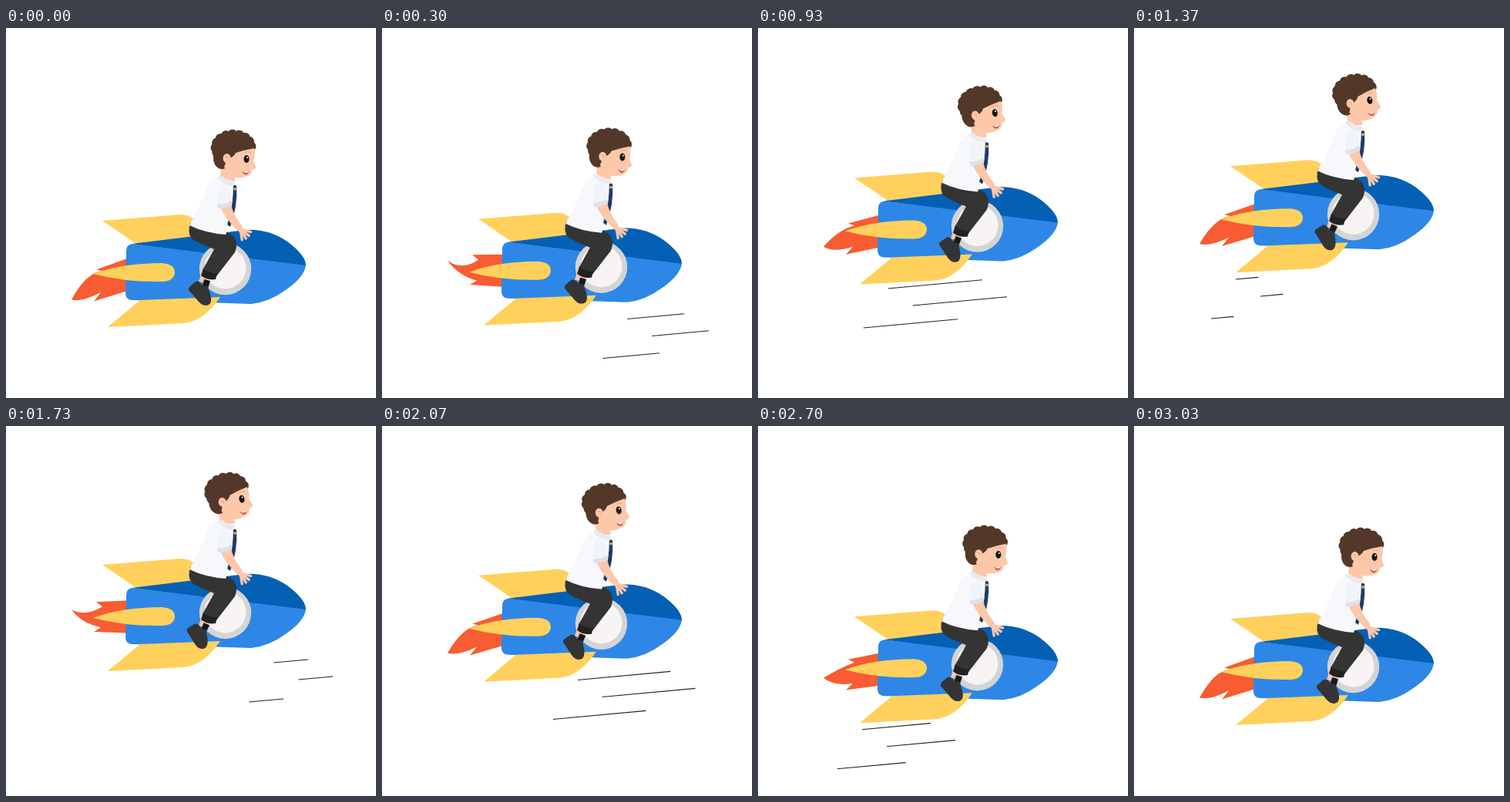
Recreate the animation shown at these times as an HTML page. Size 480 px wide and 480 px high, loop 3.06 s.

```html
<!DOCTYPE html>
<html lang="en">
<head>
<meta charset="utf-8">
<title>Rocket rider</title>
<style>
  html, body { margin: 0; width: 100%; height: 100%; overflow: hidden; background: #fff; }
  svg { display: block; width: 100%; height: 100%; }
  .yellow { fill: #ffd15c; }
  .skin { fill: #fdc7aa; }
  .cloth { fill: #343435; }
</style>
</head>
<body>
<svg viewBox="0 0 480 480">
  <g id="scene">
    <g id="streaks" stroke="#222" stroke-width="1.1"></g>

    <!-- Rocket -->
    <path id="flame" fill="#f85c32"/>
    <path class="yellow" d="M125 250 L226 242 Q246 241 262 270 L172 282Z"/>
    <path fill="#2e87e6" d="M156 289 Q156 281 164 280 L389 307 Q388 322 364 339 Q341 356 318 358 L164 353 Q156 353 155 345Z"/>
    <path fill="#0360b5" d="M163 280 L310 262 Q340 260 365 277 Q389 295 389 308Z"/>
    <path class="yellow" d="M132 388 L174 353 L278 349 Q256 381 230 383Z"/>
    <path class="yellow" d="M113 319 Q150 305 202 305 Q219 306 219 317 Q218 329 202 329 Q155 330 113 319Z"/>
    <circle cx="284.5" cy="312.5" r="33.7" fill="#d4d4d5"/>
    <circle cx="284.5" cy="311.5" r="27" fill="#f9f4f4"/>

    <!-- Leg -->
    <path class="skin" d="M253 319 L266 322 L259 331 L250 329Z"/>
    <g id="shoe">
      <path fill="#171717" d="M257 326 L265 328 L262 338 L255 335Z"/>
      <path class="cloth" d="M246 329 Q251 328 253 332 Q257 336 261 334 L265 345 Q268 356 263 359 Q256 362 250 355 L237 340 Q236 337 240 334Z"/>
    </g>
    <path class="cloth" d="M239 253 Q235 266 241 273 Q247 278 270 287 L255 314 L273 322 L297 291 Q303 275 291 267 Q286 264 280 264Z"/>
    <path fill="#222223" d="M256 312 Q264 319 274 318 L272 326 Q261 328 253 321Z"/>

    <!-- Torso and arm -->
    <path fill="#f6f8fc" d="M275 193 Q265 197 261 207 L250 233 L238 256 Q258 266 285 268 L291 252 L297 225 L297 202Z"/>
    <path fill="#213a68" d="M295 202 L299 205 Q301 230 291 258 L287 255 Q295 230 295 202Z"/>
    <circle cx="297" cy="209" r="1.8" fill="#edbd4a"/>
    <g id="fingers" stroke="#fdc7aa" stroke-width="3.4" stroke-linecap="round"></g>
    <path class="skin" d="M277 230 L292 228 Q294 242 307 258 L303 265 Q284 248 277 230Z"/>
    <path fill="#f1f4f8" d="M275 207 Q283 199 291 208 Q295 218 293 230 L275 234Z"/>
    <path fill="#dde2e8" d="M274 229 Q284 229 292 224 L293 229 Q285 235 275 234Z"/>

    <g id="head">
      <path class="skin" d="M279 180 L296 184 L297 199 Q286 199 278 193Z"/>
      <g id="hair" fill="#533829">
        <ellipse cx="295" cy="155" rx="23" ry="17"/>
        <ellipse cx="280" cy="169" rx="11" ry="14"/>
      </g>
      <path class="skin" d="M283 180 L287 170 Q295 168 298 162 Q310 158 322 156 Q324 164 321 172 L324 180 Q325 183 319 184 Q319 191 311 193 Q291 199 283 180Z"/>
      <ellipse class="skin" cx="286.5" cy="169" rx="5" ry="6"/>
      <path fill="none" stroke="#eba58a" d="M284 167 Q288 166 288 171 M309 162 Q313 159 318 162"/>
      <ellipse cx="312" cy="170" rx="3.5" ry="5" fill="#161616"/>
      <circle cx="313" cy="168" r="1" fill="#fff"/>
      <path fill="#d75d50" d="M306 186 Q311 187 315 184 Q315 192 309 190Z"/>
      <path fill="#fff" d="M307 186 Q311 187 315 184 L314 187 Q311 189 307 186Z"/>
    </g>
    <path fill="#e7ebf0" d="M274 194 Q276 190 280 192 Q287 198 296 198 L297 204 Q284 206 274 194Z"/>
  </g>
</svg>
<script>
  const LOOP = 3060, PEAK = 1500, LANDED = 3030, FLICKER = 700 / 3;
  const get = id => document.getElementById(id);
  const clamp = x => Math.max(0, Math.min(1, x));
  const set = (el, attrs) => { for (const k in attrs) el.setAttribute(k, attrs[k]); };
  const inOutCubic = x => x < .5 ? 4 * x ** 3 : 1 - 4 * (1 - x) ** 3;
  const polar = (cx, cy, rx, ry, deg) => {
    const a = deg * Math.PI / 180;
    return [cx + rx * Math.cos(a), cy + ry * Math.sin(a)];
  };

  // Curls from the fringe over the crown to the nape
  for (let deg = -5; deg > -210; deg -= 22) {
    const [x, y] = polar(295, 155, 23, 17, deg);
    get('hair').innerHTML += `<circle cx="${x}" cy="${y}" r="6.5"/>`;
  }
  for (let deg = 15; deg < 90; deg += 22) {
    const [x, y] = polar(304, 261, 14, 14, deg);
    get('fingers').innerHTML += `<line x1="304" y1="261" x2="${x}" y2="${y}"/>`;
  }
  get('streaks').innerHTML = '<line/>'.repeat(3);

  // A symmetric flame whose parts sag more the farther they are from the nozzle
  function drawFlame(t) {
    const ends = clamp(Math.min(t, LANDED - t) / 100);
    const blow = ends * (1 - Math.cos((t + 43) / FLICKER * 2 * Math.PI)) / 1.76;
    const at = (far, side, sag = 1 - blow) =>
      `${156 - far} ${317.5 + side + sag * (3 + 40 * (far / 71) ** 2)}`;
    get('flame').setAttribute('d', `M${at(0, -21)} L${at(39, -19)} L${at(31, -13)}
      Q${at(52, 0, 0)} ${at(71, -8)} Q${at(58, 9)} ${at(33, 14)} L${at(42, 20)} L${at(0, 21)}Z`);
  }

  // Each streak grows leftwards from its right end, then its right end catches up
  function drawStreaks(t) {
    const x = f => 392 - 260 * f;
    const y = x => 386.5 - .092 * (x - 245);
    const head = x(1 - clamp((1219 - t) / 1165) ** 1.4);
    const tail = x(clamp((t - 384) / 1075) ** 1.4);
    const visibility = tail - head > .3 ? 'visible' : 'hidden';
    [[0, 0], [32, 22], [-32, 51]].forEach(([dx, dy], i) => set(get('streaks').children[i],
      { x1: head + dx, y1: y(head) + dy, x2: tail + dx, y2: y(tail) + dy, visibility }));
  }

  function draw(now) {
    const t = now % LOOP;
    const lift = inOutCubic(clamp(t < PEAK ? t / PEAK : (LANDED - t) / (LANDED - PEAK)));
    set(get('scene'), { transform: `translate(0 ${-71 * lift})` });
    set(get('head'), { transform: `translate(${-lift} 0) rotate(${-12 * lift} 284 192)` });
    set(get('shoe'), { transform: `rotate(${9 * lift} 262 322)` });
    drawFlame(t);
    drawStreaks(t % (LOOP / 2));
  }

  const start = performance.now();
  function tick() {
    draw(performance.now() - start);
    requestAnimationFrame(tick);
  }
  tick();
</script>
</body>
</html>
```
